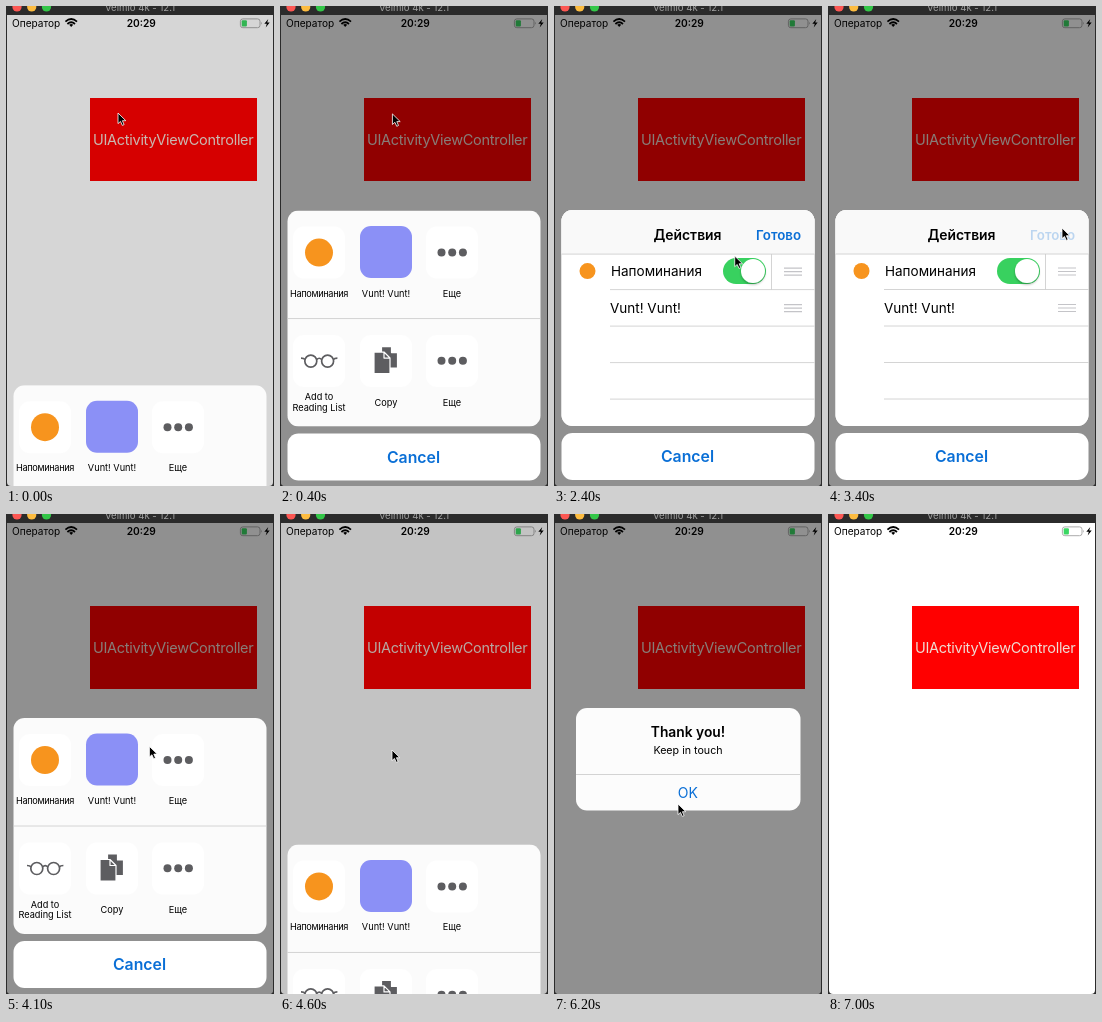
Recreate the animation shown at these times as an HTML page. Size 268 by 480 pixels, loop 7100 ms.

```html
<!DOCTYPE html>
<html lang="ru">
<head>
<meta charset="utf-8">
<title>Share sheet</title>
<style>
  html, body { margin: 0; width: 100%; height: 100%; overflow: hidden; background: #2b2b2b; }
  svg { display: block; width: 268px; height: 480px; font-family: Inter, "Open Sans", sans-serif; }
  .mid { text-anchor: middle; }
  .bold { font-weight: 600; }
  .blue { fill: #0a6fd6; }
  .label { font-size: 9.2px; text-anchor: middle; }
  .row { font-size: 13.5px; }
  .line { fill: none; stroke: #cacaca; stroke-width: .8; }
  .tile { fill: #fff; }
  .icon { fill: none; stroke: #5d5d60; stroke-width: 1.7; }
  .doc { fill: #5d5d60; stroke: #fff; stroke-width: 1.2; stroke-linejoin: round; }
</style>
</head>
<body>
<svg viewBox="0 0 268 480">
  <defs>
    <clipPath id="screenClip"><rect x="1" y="-10" width="266" height="490" rx="4"/></clipPath>
    <clipPath id="cardClip"><rect x="7.5" y="204" width="253" height="216" rx="11"/></clipPath>
    <filter id="soft" x="-30%" y="-30%" width="160%" height="180%">
      <feDropShadow dx="0" dy="1.5" stdDeviation="1.2" flood-opacity=".3"/>
    </filter>
    <g id="dots" fill="#5d5d60"><circle cx="-10.7" r="4"/><circle r="4"/><circle cx="10.7" r="4"/></g>
    <path id="handle" d="M230 -3.5h18M230 0h18M230 3.5h18" stroke="#c4c4c8" stroke-width="1.1"/>
    <path id="doc" d="M0 0H10L16 6V21.5H0Z M10 0V6H16"/>
  </defs>

  <rect width="268" height="480" fill="#2b2b2b"/>
  <g id="titleBar">
    <circle cx="11" cy="1" r="4.6" fill="#fc5753"/>
    <circle cx="25.7" cy="1" r="4.6" fill="#fdbc40"/>
    <circle cx="40.5" cy="1" r="4.6" fill="#33c748"/>
    <text class="mid" x="134" y="4.6" font-size="9.6" fill="#a2a2a2">Velmio 4k - 12.1</text>
  </g>

  <g clip-path="url(#screenClip)">
    <rect x="1" y="9" width="266" height="471" fill="#fff"/>

    <g id="statusBar">
      <text x="6" y="21" font-size="10.1">Оператор</text>
      <g fill="none" stroke="#000" stroke-width="1.8">
        <path d="M59.4 15.6Q65.2 10.4 71 15.6M61.4 18Q65.2 14.6 69 18"/>
        <path d="M63.2 18.8Q65.2 17.2 67.2 18.8L65.2 21Z" fill="#000" stroke="none"/>
      </g>
      <text class="mid bold" x="135.3" y="21" font-size="10.2">20:29</text>
      <rect x="234.4" y="12.9" width="19.6" height="8.8" rx="2.4" fill="none" stroke="#a3a3a3" stroke-width=".9"/>
      <rect x="235.7" y="14.2" width="5.2" height="6.2" rx="1" fill="#3bd763"/>
      <path d="M255.2 15.8q1.6 1.5 0 3z" fill="#a3a3a3"/>
      <path d="M262.3 13L258.3 17.8H260.8L259.7 21.6L263.7 16.6H261.2Z"/>
    </g>

    <rect x="84" y="92" width="167" height="83" fill="#f00"/>
    <text class="mid" x="167.2" y="139" font-size="14.5" letter-spacing="-.27" fill="#efdcd3">UIActivityViewController</text>

    <rect id="dim" x="1" y="9" width="266" height="471"/>

    <g id="sheet">
      <g clip-path="url(#cardClip)">
        <rect x="7" y="204" width="254" height="216" fill="#fbfbfb"/>
        <rect class="tile" x="13" y="220" width="52" height="52" rx="11"/>
        <circle cx="39" cy="246" r="14" fill="#f7941e"/>
        <rect x="80" y="219.5" width="52" height="52" rx="11" fill="#8b90f6"/>
        <rect class="tile" x="146" y="220" width="52" height="52" rx="11"/>
        <use href="#dots" x="172.2" y="246"/>
        <text class="label" x="39" y="290" letter-spacing="-.35">Напоминания</text>
        <text class="label" x="106" y="290">Vunt! Vunt!</text>
        <text class="label" x="172" y="290">Еще</text>

        <path class="line" d="M7 312H261"/>

        <rect class="tile" x="13" y="328.5" width="52" height="52" rx="11"/>
        <rect class="tile" x="80" y="328.5" width="52" height="52" rx="11"/>
        <rect class="tile" x="146" y="328.5" width="52" height="52" rx="11"/>
        <g class="icon">
          <circle cx="30.8" cy="354.5" r="6"/><circle cx="47.6" cy="354.5" r="6"/>
          <path d="M36.6 353Q39.2 350.4 41.8 353M25 353Q24 351.5 21 351.5M53.4 353Q54.4 351.5 57.4 351.5"/>
        </g>
        <use class="doc" href="#doc" x="101.5" y="340"/>
        <use class="doc" href="#doc" x="94" y="345.5"/>
        <use href="#dots" x="172.2" y="354.3"/>
        <text class="label" x="39" y="393.5">Add to</text>
        <text class="label" x="39" y="404">Reading List</text>
        <text class="label" x="106" y="399">Copy</text>
        <text class="label" x="172" y="399">Еще</text>

        <g id="list">
          <rect x="7" y="204" width="254" height="216" fill="#fff"/>
          <rect x="7" y="204" width="254" height="44" fill="#f9f9f9"/>
          <text class="mid bold" x="133.5" y="234" font-size="13.9">Действия</text>
          <text id="done" class="bold blue" x="247" y="234" font-size="13.3" text-anchor="end">Готово</text>
          <path class="line" d="M7 248H261M56 283.5H261M56 320H261M56 356.5H261M56 393H261M217.5 248V283.5"/>
          <circle cx="33.5" cy="265" r="8" fill="#f7941e"/>
          <text class="row" x="57" y="270">Напоминания</text>
          <rect x="169" y="252" width="43" height="26" rx="13" fill="#38d15f"/>
          <circle cx="199" cy="265" r="12" fill="#fff" filter="url(#soft)"/>
          <use href="#handle" y="265.5"/>
          <text class="row" x="56" y="307">Vunt! Vunt!</text>
          <use href="#handle" y="302"/>
        </g>
      </g>
      <rect x="7.5" y="427" width="253" height="47" rx="11" fill="#fff"/>
      <text class="mid bold blue" x="133.5" y="456" font-size="15.8">Cancel</text>
    </g>

    <g id="alert">
      <rect x="22" y="194" width="224.5" height="102.5" rx="11" fill="#fcfcfc"/>
      <text class="mid bold" x="134" y="223.3" font-size="13.8">Thank you!</text>
      <text class="mid" x="134" y="240" font-size="10.7">Keep in touch</text>
      <path class="line" d="M22 260.5H246.5"/>
      <text class="mid blue" x="133.8" y="283.6" font-size="14">OK</text>
    </g>
  </g>

  <path id="cursor" d="M0 0V10.6L2.5 8.4L4.3 12.4L6.1 11.6L4.4 7.7H7.8Z" stroke="#fff" stroke-width=".8"/>
</svg>

<script>
const LOOP = 7100;
const $ = id => document.getElementById(id);
const [dim, sheet, list, done, alertBox, cursor] =
  ["dim", "sheet", "list", "done", "alert", "cursor"].map($);

// Cursor stops: arrival time, x, y, departure time
const stops = [
  [0, 112, 107, 350],
  [1450, 179, 251, 2300],
  [3250, 234, 222, 3600],
  [4350, 112, 236, 4620],
  [5060, 239, 277, 5450],
  [6150, 124, 290, 6400],
  [6900, 272, 445, LOOP]
];

// Critically damped spring, 0 to 1
function spring(ms) {
  const x = Math.max(0, ms) * .018;
  return 1 - (1 + x) * Math.exp(-x);
}

const shown = (t, from, to) => t < to ? spring(t - from) : spring(to - from) * (1 - spring(t - to));

function cursorAt(t) {
  const i = stops.findLastIndex(s => s[0] <= t);
  const [, x, y, leave] = stops[i];
  const next = stops[i + 1];
  if (!next || t <= leave) return [x, y];
  const u = (t - leave) / (next[0] - leave);
  const k = u * u * (3 - 2 * u);
  return [x + (next[1] - x) * k, y + (next[2] - y) * k];
}

function draw(t) {
  const sheetIn = shown(t, -70, 4515);
  const listIn = shown(t, 1850, 3500);
  const alertIn = shown(t, 5015, 6260);
  const zoom = t < 6260 ? 1.2 - .2 * alertIn : 1;

  dim.setAttribute("opacity", .435 * Math.max(sheetIn, alertIn));
  sheet.setAttribute("transform", `translate(0 ${276 * (1 - sheetIn)})`);
  list.setAttribute("transform", `translate(0 ${217 * (1 - listIn)})`);
  done.setAttribute("opacity", t > 3330 && t < 3500 ? .25 : 1);
  alertBox.setAttribute("opacity", alertIn);
  alertBox.setAttribute("transform", `translate(134 245.2) scale(${zoom}) translate(-134 -245.2)`);
  cursor.setAttribute("transform", `translate(${cursorAt(t)})`);
}

const begin = performance.now();
function tick() {
  draw((performance.now() - begin) % LOOP);
  requestAnimationFrame(tick);
}
tick();
</script>
</body>
</html>
```
